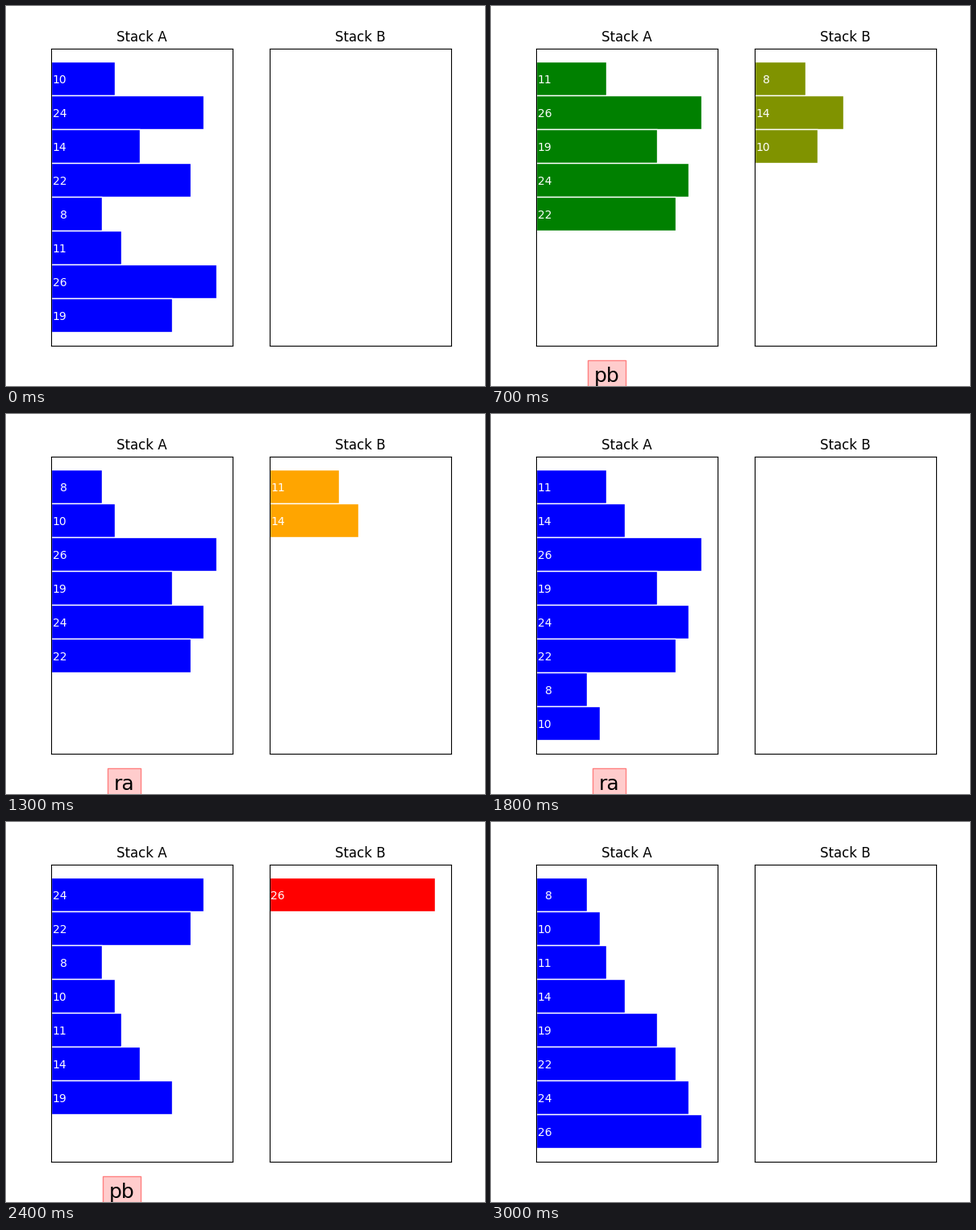
Recreate the animation shown at these times as a matplotlib script. Size 594 by 472 pixels, loop 5.3 s.

```python
import matplotlib.pyplot as plt
from matplotlib.animation import FuncAnimation

WIDTH, HEIGHT, DPI = 594, 472, 100
STEP_MS, FRAMES = 100, 53
START = [10, 24, 14, 22, 8, 11, 26, 19]
OPS = ("pb ra pb ra pb pb rb pa rb pa sa ra ra pa pa sa ra ra "
       "sa ra pb sa ra pa sa ra ra").split()

# Bar colour depends on how many items the stack holds; six or more are blue.
GREEN = (0, 128 / 255, 0)
SIZE_COLORS = {1: "red", 2: "orange", 3: (0.5, 146.5 / 255, 0),
               4: GREEN, 5: GREEN}

AXES_W, AXES_H, AXES_BOTTOM = 225.4545, 369.6, 49.8
X_MAX = max(START) * 1.1
LABEL_X = 19.44 * X_MAX / AXES_W


def apply_op(op, a, b):
    stack = a if op[1] == "a" else b
    if op == "pa":
        a.insert(0, b.pop(0))
    elif op == "pb":
        b.insert(0, a.pop(0))
    elif op[0] == "s":
        stack[0], stack[1] = stack[1], stack[0]
    else:
        stack.append(stack.pop(0))


def build_states():
    a, b = list(START), []
    states = [(tuple(a), tuple(b))]
    for op in OPS:
        apply_op(op, a, b)
        states.append((tuple(a), tuple(b)))
    return states


def progress(tick):
    """Number of finished operations and index of the captioned one."""
    if tick < 3:
        return 0, None
    if tick in (4, 15):  # the display stalls for one tick
        tick -= 1
    if tick < 22:
        return tick - 2, tick - 2
    if tick < 24:
        return 20, tick - 3
    if tick < 30:
        return tick - 3, tick - 4
    return len(OPS), None


def make_axes(left, title):
    ax = fig.add_axes([left / WIDTH, AXES_BOTTOM / HEIGHT,
                       AXES_W / WIDTH, AXES_H / HEIGHT])
    ax.set_title(title, fontsize=12)
    ax.set(xticks=[], yticks=[], xlim=(0, X_MAX),
           ylim=(len(START) - 0.1, -0.9))
    return ax


def draw_stack(ax, values):
    if not values:
        return
    color = SIZE_COLORS.get(len(values), "blue")
    bars = ax.barh(range(len(values)), values, height=1, color=color,
                   edgecolor="white", linewidth=1)
    drawn.extend(bars)
    for row, value in enumerate(values):
        drawn.append(ax.text(LABEL_X, row, str(value), color="white",
                             fontsize=10, ha="right", va="center_baseline"))
    ax.set(xlim=(0, X_MAX), ylim=(len(START) - 0.1, -0.9))


def clear():
    while drawn:
        drawn.pop().remove()
    caption.set_visible(False)
    return []


def update(tick):
    clear()
    done, current = progress(tick)
    for ax, values in zip((ax_a, ax_b), STATES[done]):
        draw_stack(ax, values)
    if current is not None:
        caption.set_text(OPS[current])
        caption.set_visible(True)
    return []


plt.rcParams["font.family"] = "DejaVu Sans"
STATES = build_states()
drawn = []
fig = plt.figure(figsize=(WIDTH / DPI, HEIGHT / DPI), dpi=DPI,
                 facecolor="white")
ax_a = make_axes(56, "Stack A")
ax_b = make_axes(326.5455, "Stack B")
caption = fig.text(159 / WIDTH, 1 - 447.7 / HEIGHT, "", fontsize=18,
                   ha="right", va="top",
                   bbox=dict(boxstyle="square", ec=(1, 0.5, 0.5),
                             fc=(1, 0.8, 0.8)))

anim = FuncAnimation(fig, update, frames=FRAMES, init_func=clear,
                     interval=STEP_MS, repeat=True, repeat_delay=0)
plt.show()
```
